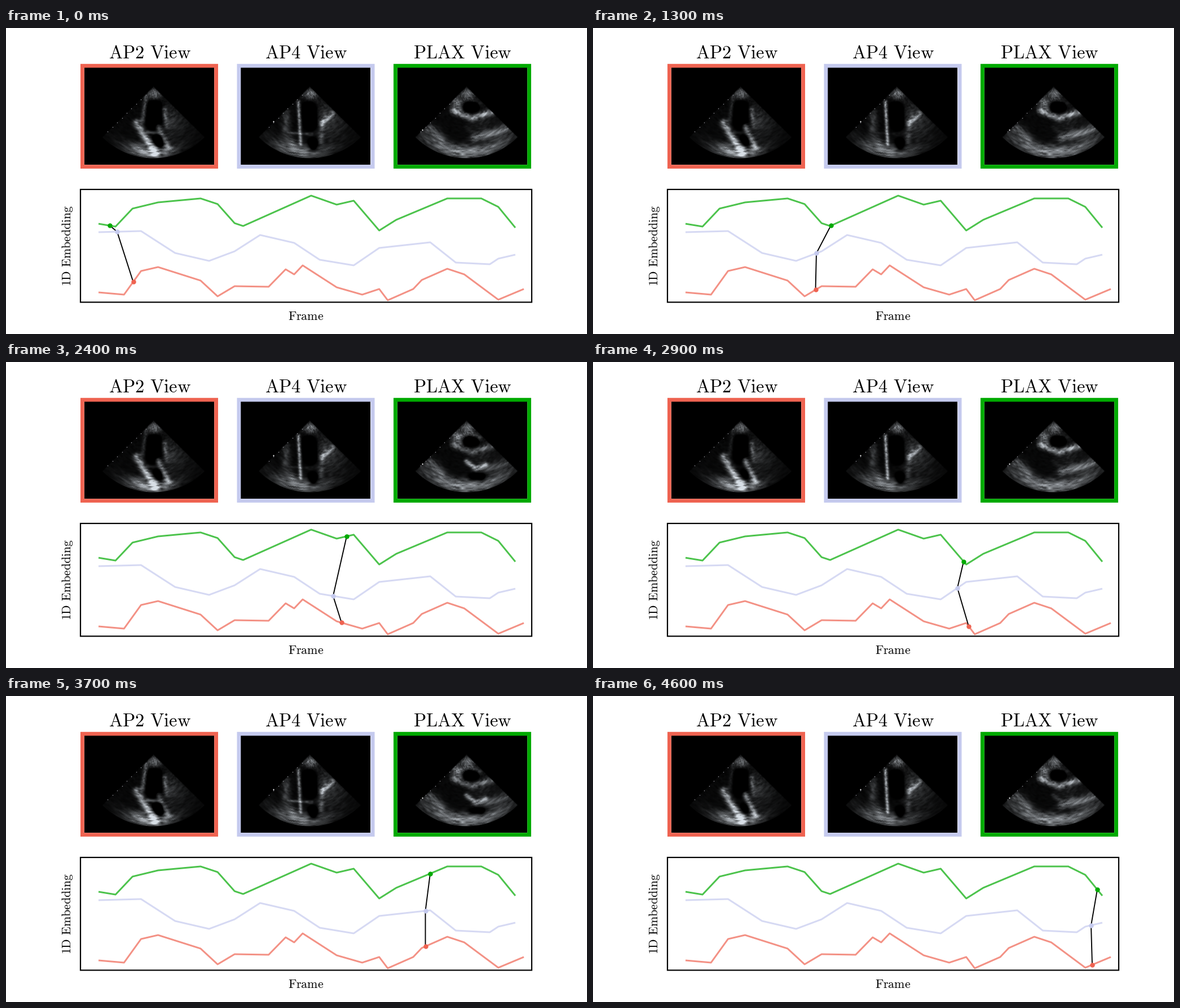
Recreate the animation shown at these times as a matplotlib script. Size 1030 by 544 pixels, loop 4700 ms.

```python
import numpy as np
import matplotlib.pyplot as plt
from matplotlib.animation import FuncAnimation
from matplotlib.patches import Rectangle

W, H, DPI = 1030, 544, 100
FRAMES, STEP_MS = 47, 100
PT = 72 / DPI  # points per pixel
RED, LILAC, GREEN = "#ef6351", "#c5caee", "#00aa00"
plt.rcParams["mathtext.fontset"] = "cm"


# ---- embedding curves ----
X0, DX = 164, 15.08
KEY_FRAMES = [0, 6, 13, 20, 29, 37, 46]  # moments where the views are matched


class Curve:
    """Straight runs between (sample, height) turns, and marker stops in x."""

    def __init__(self, color, turns, stops):
        i, self.y = np.array(turns).T
        self.x = X0 + DX * i
        self.color, self.stops = color, stops

    def marker(self, k):
        x = np.interp(k, KEY_FRAMES, self.stops)
        return x, np.interp(x, self.x, self.y)


curves = [
    Curve(GREEN,
          [(0, 348), (2, 353), (4, 321), (7, 310), (12, 303), (14, 313),
           (16, 347), (17, 352), (25, 298), (28, 314), (30, 307), (33, 360),
           (35, 341), (41, 303), (45, 303), (47, 318), (49, 355)],
          [184, 328, 421.5, 561.5, 657, 752, 894]),
    Curve(LILAC,
          [(0, 363), (5, 361), (9, 400), (13, 414), (16, 397), (19, 368),
           (23, 382), (26, 412), (30, 422), (33, 391), (39, 381), (42, 417),
           (46, 420), (47, 410), (49, 403)],
          [197, 299.5, 396, 527, 646, 743.5, 883]),
    Curve(RED,
          [(0, 470), (3, 474), (5, 432), (7, 425), (12, 449), (14, 477),
           (16, 459), (20, 460), (22, 429), (23, 438), (24, 422), (28, 461),
           (31, 474), (33, 464), (34, 484), (37, 464), (38, 448), (41, 428),
           (43, 438), (47, 483), (50, 464)],
          [225.5, 301, 394.5, 538, 666, 743.5, 885]),
]

# ---- ultrasound fans ----
IW, IH = 230, 173
AX, AY = 122.5, 33  # fan apex inside the picture
py, px = np.mgrid[0:IH, 0:IW] + 0.5
px, py = px - AX, py - AY
rad, ang = np.hypot(px, py), np.arctan2(px, py)
fan = (py > 0) * np.clip(129 - rad, 0, 1) * np.clip((0.79 - abs(ang)) * rad / 2, 0, 1)


def streaks(seed):
    """Soft grain drawn out along the arcs of the fan."""
    grain = np.random.default_rng(seed).random((260, 32))
    grain = (grain[:-2] + grain[1:-1] + grain[2:]) / 3
    u = np.clip((ang + 0.9) / 1.8, 0, 0.999) * 30
    i, j = rad.astype(int), u.astype(int)
    return 0.3 + 1.4 * (grain[i, j] * (1 - u + j) + grain[i, j + 1] * (u - j))


def arc(r, a, r_width, a_width):
    return np.exp(-((rad - r) / r_width)**2 - ((ang - a) / a_width)**2)


def stroke(points, width):
    d2 = np.full(px.shape, 1e9)
    for (x0, y0), (x1, y1) in zip(points[:-1], points[1:]):
        vx, vy = x1 - x0, y1 - y0
        t = np.clip(((px - x0) * vx + (py - y0) * vy) / (vx**2 + vy**2), 0, 1)
        d2 = np.minimum(d2, (px - x0 - t * vx)**2 + (py - y0 - t * vy)**2)
    return np.exp(-d2 / width**2)


class Scan:
    """Walls: points, width, level when closed, level when open.
    A negative level makes a dark chamber."""

    def __init__(self, seed, floor, haze, walls):
        tex = streaks(seed) * fan
        tilt, spread, level = floor
        base = (0.03 + 0.4 * arc(14, 0.1, 9, 0.8) + haze * arc(65, 0.45, 35, 0.35)
                + level * arc(118, tilt, 12, spread))
        self.tex, self.closed, self.open = tex, base.copy(), base.copy()
        for points, width, closed, opened in walls:
            shape = stroke(points, width)
            self.closed += closed * shape
            self.open += opened * shape

    def image(self, s):
        v = self.closed + (self.open - self.closed) * s
        v = np.clip(v * self.tex, 0, 0.9)
        return v[..., None] * np.array([0.94, 0.97, 1.0])


two_chamber = Scan(3, (-0.05, 0.33, 0.6), 0.14, [
    ([(-30, 66), (-20, 84), (4, 118)], 6, 0.55, 0.6),
    ([(-13, 20), (-20, 64)], 4, 0.4, 0.08),
    ([(20, 42), (24, 72)], 4, 0.25, 0.2),
    ([(-14, 82), (14, 84)], 3, 0.4, 0),
    ([(8, 72), (28, 112)], 5, 0.1, 0.4),
    ([(3, 38), (4, 64)], 13, -0.3, -0.2),
    ([(8, 96), (10, 104)], 8, -0.7, -0.2),
])
four_chamber = Scan(8, (-0.15, 0.4, 0.42), 0.18, [
    ([(-20, 28), (-16, 104)], 3, 0.3, 0.5),
    ([(40, 50), (22, 66)], 5, 0.45, 0.4),
    ([(22, 66), (20, 100)], 5, 0.25, 0.12),
    ([(-42, 50), (-42, 85), (-28, 108)], 7, 0.22, 0.18),
    ([(-38, 83), (4, 86)], 2.5, 0.35, 0),
    ([(2, 42), (4, 66)], 12, -0.25, -0.25),
    ([(6, 102), (6, 110)], 8, -0.4, -0.3),
])
long_axis = Scan(15, (0, 0.65, 0.5), 0.08, [
    ([(-20, 26), (-16, 38)], 9, 0.3, 0.3),
    ([(-24, 44), (10, 58), (46, 46)], 5, 0.25, 0.5),
    ([(-14, 30), (6, 24), (22, 32)], 5, 0.25, 0.1),
    ([(0, 74), (16, 86), (34, 80)], 4, 0.6, 0.05),
    ([(12, 94), (48, 84), (72, 74)], 7, 0.15, 0.35),
    ([(-64, 76), (-44, 96)], 9, 0.25, 0.25),
    ([(4, 37), (14, 37)], 8, -0.4, -0.4),
    ([(14, 100), (26, 102)], 9, -0.4, -0.1),
])

# ---- stage ----
fig = plt.figure(figsize=(W / DPI, H / DPI), dpi=DPI, facecolor="white")
ax = fig.add_axes([0, 0, 1, 1])


def label(x, y, text, size, **kw):
    tex = r"$\mathrm{%s}$" % text.replace(" ", r"\hspace{0.37}")
    ax.text(x, y, tex, fontsize=size * PT, ha="center", va="baseline", **kw)


def frame(x, y, w, h, color, width):
    ax.add_patch(Rectangle((x, y), w, h, fill=False, ec=color, lw=width * PT,
                           snap=False, zorder=3))


def panel(left, title, color, first, last):
    label(left + 122.5, 53.5, title, 32.5)
    x, y = round(left + 7), 70
    im = ax.imshow(np.zeros((IH, IW, 3)), extent=(x, x + IW, y + IH, y),
                   interpolation="nearest", aspect="auto", zorder=2)
    frame(left + 3.4, 67.2, 237.2, 179.4, color, 6.8)
    i = np.arange(first, last)
    ax.plot(x + AX - 14 - 8.4 * i, y + AY + 16 + 8.1 * i, "o", color="#a8a8b0",
            ms=1.4 * PT, mew=0, zorder=4)
    return im


panels = [
    (panel(132, "AP2 View", RED, 0, 9), two_chamber),
    (panel(409.5, "AP4 View", LILAC, 0, 8), four_chamber),
    (panel(687, "PLAX View", GREEN, 2, 9), long_axis),
]
ax.plot([474, 737.5], [165.5, 180.5], "o", color="white", ms=2.2 * PT, mew=0,
        zorder=4)

frame(132, 287, 800, 200.5, "black", 2.2)
label(532, 518.8, "Frame", 22)
label(114.7, 386.6, "1D Embedding", 21.75, rotation=90, rotation_mode="anchor")

for c in curves:
    ax.plot(c.x, c.y, color=c.color, alpha=0.7, lw=3 * PT, zorder=2,
            solid_joinstyle="round", solid_capstyle="butt")
link, = ax.plot([], [], color="black", lw=1.9 * PT, zorder=4)
markers = [ax.plot([], [], "o", color=c.color, ms=8.4 * PT, mew=0, zorder=5)[0]
           for c in curves]

ax.set_xlim(0, W)
ax.set_ylim(H, 0)
ax.axis("off")


def draw(k):
    spots = [c.marker(k) for c in curves]
    link.set_data(*zip(*spots))
    for m, (x, y) in zip(markers, spots):
        m.set_data([x], [y])
    # The heart pose follows the embedding value
    long_s = np.clip((spots[0][1] - 303) / 48, 0, 1)
    apical_s = np.clip((spots[2][1] - 430) / 40, 0, 1)
    for (im, scan), s in zip(panels, (apical_s, apical_s, long_s)):
        im.set_data(scan.image(s))
    return [link, *markers, *(im for im, _ in panels)]


anim = FuncAnimation(fig, draw, frames=FRAMES, interval=STEP_MS, repeat=True)
plt.show()
```
